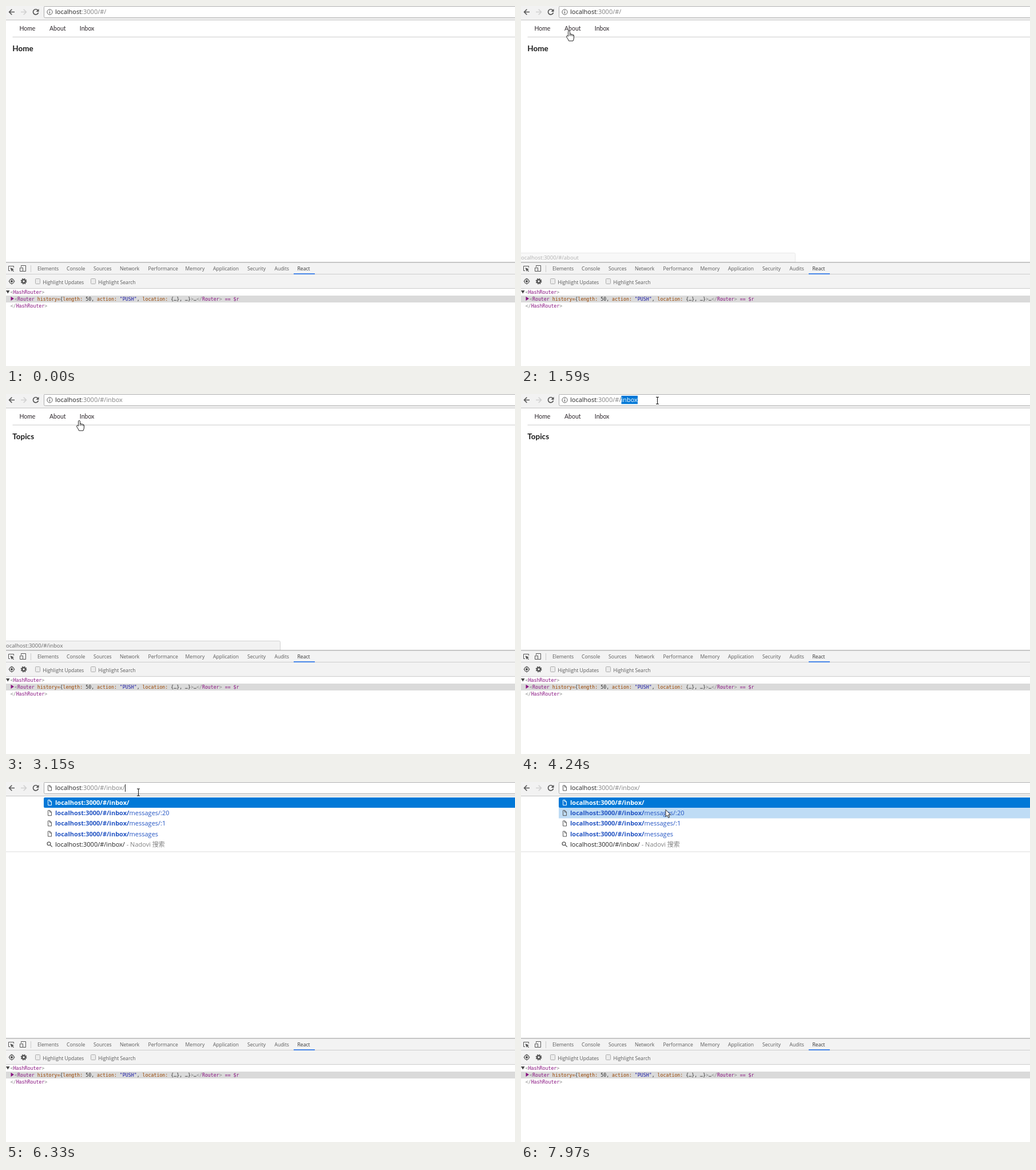
An HTML page that plays this animation: 890x629 px, repeating every 8 s.

```html
<!DOCTYPE html>
<html lang="en">
<head>
<meta charset="utf-8">
<title>Hash routing demo</title>
<style>
html, body { margin: 0; width: 100%; height: 100%; overflow: hidden; background: #fff; }
svg { display: block; }
text { white-space: pre; }
.url { font: 11px "Open Sans", "Noto Sans CJK SC", "Noto Sans CJK", sans-serif; fill: #808080; }
.url b, .bold { font-weight: 700; }
.dark { fill: #222; }
.blue { fill: #2455c3; }
.nav { font: 10.5px Lato, sans-serif; fill: #2b2429; }
.title { font: 700 13.5px Lato, sans-serif; fill: #1b1b1b; }
.tool { font: 8.65px "Open Sans", sans-serif; fill: #5a5a5a; }
.code { font: 8.25px "DejaVu Sans Mono", monospace; fill: #303030; }
.tag { fill: #881280; }
.attr { fill: #994500; }
.str { fill: #1a1aa6; }
.br { fill: #888; }
.line { fill: none; stroke: #555; }
</style>
</head>
<body>
<svg width="890" height="629" viewBox="0 0 890 629">
  <defs>
    <path id="doc" class="line" d="M-2.5-4.5H.8L3.5-1.8V4.5H-2.5ZM.5-4.5V-1.5H3.5"/>
  </defs>

  <!-- browser toolbar -->
  <path fill="#f2f2f2" d="M0 0H890V24H0Z"/>
  <path fill="#c4c4c4" d="M0 24H890V25H0Z"/>
  <rect x="66.5" y=".5" width="840" height="20" rx="2" fill="#fff" stroke="#aaa"/>
  <path class="line" stroke-width="1.6" d="M15 10.5H6M10.3 5.8L5.6 10.5L10.3 15.2"/>
  <path class="line" stroke-width="1.6" style="stroke:#d0d0d0" d="M26 10.5H35M30.7 5.8L35.4 10.5L30.7 15.2"/>
  <path class="line" stroke-width="1.7" d="M55.6 7.4A4.6 4.6 0 1 0 56.5 11.6"/>
  <path fill="#555" d="M57.5 5V10H52.5Z"/>
  <g id="info" class="line">
    <circle cx="76.5" cy="10.5" r="4.6"/>
    <path stroke-width="1.2" d="M76.5 9.8V13.2M76.5 7.6V8.8"/>
  </g>
  <use id="page" href="#doc" x="76" y="10.5"/>
  <path id="mark" fill="#0078d7"/>
  <text class="url" x="86" y="14"><tspan id="host">localhost</tspan><tspan id="port">:3000/#/</tspan><tspan id="path"></tspan></text>
  <path id="caret" fill="#222"/>

  <!-- page -->
  <text class="nav" x="23.4" y="43">Home</text>
  <text class="nav" x="76" y="43">About</text>
  <text class="nav" x="128.8" y="43">Inbox</text>
  <path fill="#dcdcdc" d="M11.5 53.5H890V55H11.5Z"/>
  <text class="title" id="title" x="11.3" y="79.3"></text>

  <g id="status">
    <path fill="#f2f2f2" stroke="#d2d2d2" d="M-1 431.5H477.5Q479.5 431.5 479.5 433.5V448H-1Z"/>
    <text class="url" id="link" x="-2.4" y="443.3" style="font-size:9.5px;fill:#666"></text>
  </g>

  <g id="drop">
    <path fill="#fff" d="M0 25H890V121H0Z"/>
    <path fill="#e8e8e8" d="M0 121H890V122.5H0Z"/>
    <path fill="#0078d7" d="M890 27H68Q66 27 66 29V43Q66 45 68 45H890Z"/>
    <path id="hover" fill="#bfdcf5" d="M66 45H890V63.5H66Z"/>
    <g id="rows"></g>
    <path class="line" stroke-width="1.3" d="M77.4 110.2L80.8 113.4"/>
    <circle class="line" stroke-width="1.3" cx="75" cy="107.7" r="2.9"/>
  </g>

  <!-- developer tools -->
  <path fill="#f3f3f3" d="M0 448H890V493H0Z"/>
  <path fill="#a8a8a8" d="M0 447.3H890V448.6H0Z"/>
  <path fill="#ccc" d="M0 468H890V469H0ZM0 493H890V494H0ZM43 453H44V465H43Z"/>
  <path fill="#4a87e8" d="M503 467H540V469H503Z"/>
  <path class="line" d="M7 462.5H4.5V454.5H13.5V457"/>
  <path fill="#555" d="M7.5 457L14 460L11.6 460.9L14 463.4L13 464.3L10.6 461.9L9.7 464Z"/>
  <path class="line" d="M26.5 456V453.5H34.5V463.5H30M24.5 457.5H29.5V463.5H24.5Z"/>
  <g id="tabs"></g>
  <circle class="line" stroke-width="1.3" cx="10" cy="481" r="4"/>
  <circle cx="10" cy="481" r="1.9" fill="#444"/>
  <path class="line" d="M10 475.5V477M10 485V486.5M4.5 481H6M14 481H15.5"/>
  <circle class="line" stroke-width="2.4" cx="31" cy="481" r="2.9"/>
  <circle class="line" stroke-width="1.8" stroke-dasharray="1.9 1.63" cx="31" cy="481" r="4.5"/>
  <g fill="#ececec" stroke="#adadad">
    <rect x="51.5" y="476.5" width="8" height="9" rx="1"/>
    <rect x="148.5" y="476.5" width="8" height="9" rx="1"/>
  </g>
  <text class="tool" x="64.3" y="486">Highlight Updates</text>
  <text class="tool" x="161.3" y="486">Highlight Search</text>

  <path fill="#dadada" d="M0 506H890V518H0Z"/>
  <path fill="#444" d="M0 497H6.5L3.2 502.5Z"/>
  <path fill="#881280" d="M8.5 507.7V515L14 511.3Z"/>
  <g class="code">
    <text x="7.7" y="502.6"><tspan class="br">&lt;</tspan><tspan class="tag">HashRouter</tspan><tspan class="br">&gt;</tspan></text>
    <text x="15" y="514.8"><tspan class="br">&lt;</tspan><tspan class="tag">Router </tspan><tspan class="attr">history=</tspan>{<tspan class="attr">length: </tspan>50, <tspan class="attr">action: </tspan><tspan class="str">"PUSH"</tspan>, <tspan class="attr">location: </tspan>{…}, …}<tspan class="br">&gt;</tspan>…<tspan class="br">&lt;/</tspan><tspan class="tag">Router</tspan><tspan class="br">&gt;</tspan><tspan class="tag"> == $r</tspan></text>
    <text x="7.7" y="526.8"><tspan class="br">&lt;/</tspan><tspan class="tag">HashRouter</tspan><tspan class="br">&gt;</tspan></text>
  </g>

  <path id="pointer" stroke-linejoin="round"/>
</svg>
<script>
const $ = id => document.getElementById(id);
const show = (id, on) => $(id).setAttribute('visibility', on ? 'inherit' : 'hidden');
const inbox = 'localhost:3000/#/inbox/';

const tabs = { Elements: 55, Console: 106, Sources: 153, Network: 199, Performance: 248.5, Memory: 313.5,
  Application: 362, Security: 422, Audits: 469.5, React: 509.5 };
$('tabs').innerHTML = Object.entries(tabs).map(([name, x]) =>
  `<text class="tool" x="${x}" y="462" ${name == 'React' ? 'style="fill:#333"' : ''}>${name}</text>`).join('');

$('rows').innerHTML = ['', 'messages/:20', 'messages/:1', 'messages'].map((tail, i) => {
  const y = 36 + i * 18.2, look = i ? 'class="url blue"' : 'class="url" style="fill:#fff"';
  return `<use href="#doc" x="76" y="${y}" ${i ? '' : 'style="filter:brightness(3)"'}/>
    <text ${look} x="86" y="${y + 4}"><tspan class="bold">${inbox}</tspan>${tail}</text>`;
}).join('') + `<text class="url" x="86" y="112.6"><tspan class="dark">${inbox}</tspan> - Nadovi 搜索</text>`;

// Pointer moves: first step, last step, number of steps, x, y
const moves = [
  [290, 290, 1, 824, 601], [440, 670, 4, 112, 133],
  [840, 980, 3, 85, 70], [1050, 1210, 3, 42, 58], [1290, 1440, 3, 84, 43],
  [1750, 2050, 5, 130, 41], [2140, 2310, 3, 142, 41], [2680, 2680, 1, 141, 40],
  [2830, 3150, 5, 128, 46], [3230, 3610, 6, 239.5, 9], [3920, 3920, 1, 239.5, 10],
  [4240, 4240, 1, 238.5, 11.5], [4860, 4940, 2, 231.5, 18], [7660, 7970, 5, 252.5, 48]
];
const shapes = {
  arrow: 'M.5 .5V12.5L3.2 10L5.2 14.4L7.2 13.5L5.2 9.2H9Z',
  hand: 'M-1.5 10V1.8Q-1.5 .5 0 .5T1.5 1.8V6Q3.2 5.3 4.2 6.6Q6 6 6.7 7.4Q8.5 7.2 8.5 9V12Q8.5 15 7 18H-.5Q-1.5 15-4 11.8Q-5 9.6-3.6 8.9Q-2.5 8.8-1.5 10ZM1.5 6V9.5M4.2 6.6V9.5M6.7 7.4V9.8',
  beam: 'M-2.5-6H2.5M0-6V6M-2.5 6H2.5'
};

function pointerAt(t) {
  let x = 836, y = 604;
  for (const [start, end, steps, toX, toY] of moves) {
    if (t < start) break;
    const step = 1 + Math.floor((t - start) / (end - start || 1) * (steps - 1) + 1e-6);
    const k = Math.min(1, step / steps);
    x += (toX - x) * k;
    y += (toY - y) * k;
  }
  return [x, y];
}

const between = (t, a, b) => t >= a && t < b;

function draw(t) {
  const [x, y] = pointerAt(t);
  const onLink = between(y, 27, 53) && between(x, 64, 168) && t < 4000;
  const kind = y < 22 && x > 66 ? 'beam' : onLink ? 'hand' : 'arrow';
  const p = $('pointer');
  p.setAttribute('d', shapes[kind]);
  p.setAttribute('transform', `translate(${x} ${y})`);
  p.setAttribute('fill', kind == 'beam' ? 'none' : '#fff');
  p.setAttribute('stroke', kind == 'beam' ? '#111' : '#222');
  show('pointer', t >= 210);

  const route = t < 1670 ? 0 : t < 2450 ? 1 : 2;
  const typed = t >= 6330;
  $('title').textContent = ['Home', 'About', 'Topics'][route];
  $('path').textContent = ['', 'about', 'inbox'][route] + (typed ? '/' : '');

  const all = between(t, 3690, 4070) || between(t, 4560, 5090);
  const word = between(t, 3690, 5090);
  $('mark').setAttribute('d', word ? `M${all ? 86 : 175.5} 3H204V17.5H${all ? 86 : 175.5}Z` : '');
  $('host').style.fill = all ? '#fff' : '#222';
  $('port').style.fill = all ? '#fff' : '';
  $('path').style.fill = word ? '#fff' : '';

  const caretOn = between(t, 5090, 5550) || between(t, 6100, 6790) || between(t, 7340, 7870);
  $('caret').setAttribute('d', `M${typed ? 208 : 203.5} 4h1v13h-1Z`);
  show('caret', caretOn);

  const fade = t < 1590 || t >= 3770 ? 0 : t < 1670 ? .5 : t < 3610 ? 1 : t < 3690 ? .6 : .3;
  $('status').setAttribute('opacity', fade);
  $('link').textContent = 'localhost:3000/#/' + (x < 116 ? 'about' : 'inbox');

  show('info', !typed);
  show('page', typed);
  show('drop', typed);
  show('hover', typed && y > 45);
}

const begin = performance.now();
function tick() {
  draw((performance.now() - begin) % 8000);
  requestAnimationFrame(tick);
}
tick();
</script>
</body>
</html>
```
